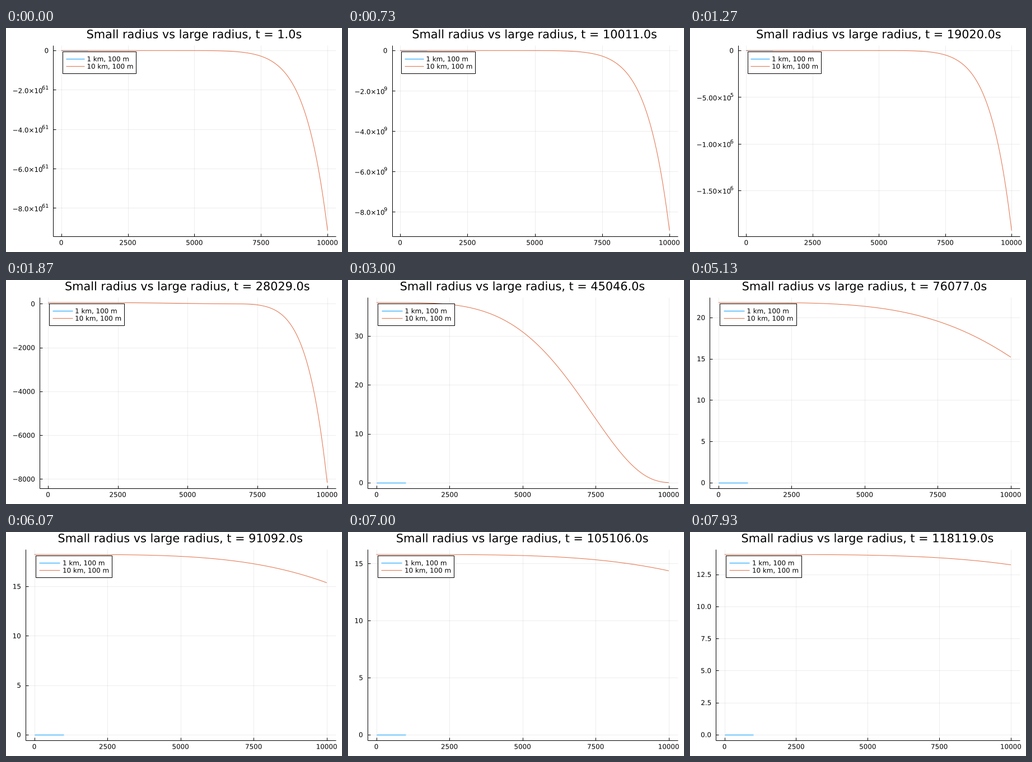
Recreate the animation shown at these times as a matplotlib script. Size 600 by 400 pixels, loop 8000 ms.

```python
import math

import numpy as np
import matplotlib.pyplot as plt
from matplotlib.animation import FuncAnimation
from matplotlib.patches import PathPatch, Rectangle
from matplotlib.path import Path
from matplotlib.textpath import TextPath
from matplotlib.transforms import Affine2D

W, H, DPI = 600, 400, 100
FRAMES, LOOP_MS = 120, 8000
PX = 72 / DPI                       # one pixel in points
TOP, BOTTOM, RIGHT = 30.5, 371.5, 588.5
PAD = 0.03                          # axis padding as a share of the data range
SMALL, SUPER, LARGE = 11.9, 9.5, 20.8
BLUE, ORANGE = "#009AFA", "#E36F47"
NICE = [(1, 1.0), (5, 0.9), (2, 0.7), (2.5, 0.5), (3, 0.2)]

plt.rcParams["font.family"] = "DejaVu Sans"
fig = plt.figure(figsize=(W / DPI, H / DPI), dpi=DPI, facecolor="white")
ax = fig.add_axes([0, 0, 1, 1])


def dome(r, t, radius, t_height, t_radius):
    """Height of a spreading dome that starts 100 m high."""
    return 100 * t_height / t * (1 - (t_radius * r / (t * radius)) ** 4) ** 3


def nice_ticks(lo, hi):
    """Pick 4 to 8 round ticks, scored on count, coverage and niceness."""
    span = hi - lo
    order = math.floor(math.log10(span))
    best, best_score = [], -math.inf
    for z in range(order - 2, order + 1):
        for q, niceness in NICE:
            step = q * 10.0 ** z
            first, last = math.ceil(lo / step), math.floor(hi / step)
            n = last - first + 1
            if not 4 <= n <= 8:
                continue
            count = 1 - abs(n - 5) / 5
            cover = 1.5 * span / ((n - 1) * step)
            score = count / 4 + cover / 3 + niceness / 4
            if score > best_score:
                best_score = score
                best = [i * step for i in range(first, last + 1)]
    return best


def decimals(number):
    return len(number.rstrip("0").split(".")[1])


def tick_labels(ticks):
    """Pairs of (text, exponent); the exponent is empty for plain numbers."""
    if math.log10(ticks[-1] - ticks[0]) > 5:
        parts = [f"{v:.8e}".split("e") for v in ticks]
        d = max(decimals(m) for m, _ in parts) + 1
        pairs = [(f"{float(m):.{d}f}×10", str(int(e))) if float(m) else ("0", "")
                 for m, e in parts]
    else:
        d = max(decimals(f"{v:.8f}") for v in ticks)
        pairs = [(f"{v + 0.0:.{d}f}", "") for v in ticks]
    return [(s.replace("-", "−"), e) for s, e in pairs]


def ink(s, size):
    """Outline of a text with its left edge and inked width."""
    path = TextPath((0, 0), s, size=size)
    xs = path.vertices[path.codes != Path.CLOSEPOLY, 0]
    return path, xs.min(), xs.max() - xs.min()


def write(x, y, s, size, align):
    """Put text on baseline y; align 0, 0.5 or 1 is left, centre or right."""
    path, left, width = ink(s, size)
    move = Affine2D().scale(1, -1).translate(x - left - align * width, y)
    ax.add_patch(PathPatch(path.transformed(move), fc="black", lw=0, zorder=6))
    return width


def line(x, y, color="black", width=1.0, alpha=1.0, z=2):
    ax.plot(x, y, color=color, lw=width * PX, alpha=alpha, zorder=z,
            solid_capstyle="butt")


def label_width(label):
    text, power = label
    return ink(text, SMALL)[2] + (ink(power, SUPER)[2] if power else 0)


def draw_legend(left):
    width = RIGHT - left
    x = left + 0.0328 * width
    y = TOP + (BOTTOM - TOP) / 30
    names = ["1 km, 100 m", "10 km, 100 m"]
    box = 0.1 * width + ink(names[1], SMALL)[2]
    ax.add_patch(Rectangle((x, y), box, 39, fc="white", ec="black",
                           lw=PX, zorder=4))
    for i, (name, color) in enumerate(zip(names, (BLUE, ORANGE))):
        row = y + 13.2 * (i + 1)
        line([x + 0.0115 * width, x + 0.078 * width], [row, row], color, z=5)
        write(x + 0.089 * width, row + 4.4, name, SMALL, 0)


def draw(k):
    t = 1.0 + 1001 * k
    r_small, r_large = np.linspace(0, 1000, 101), np.linspace(0, 10000, 501)
    small = dome(r_small, t, 1000, 1.66, 4.4167)
    large = dome(r_large, t, 10000, 16602, 44167)
    lo, hi = min(small.min(), large.min()), max(small.max(), large.max())
    pad = PAD * (hi - lo)
    ticks = nice_ticks(lo - pad, hi + pad)
    labels = tick_labels(ticks)
    left = 21.85 + max(label_width(label) for label in labels)

    def to_x(r):
        return left + (RIGHT - left) * (r / 10000 + PAD) / (1 + 2 * PAD)

    def to_y(v):
        return BOTTOM - (BOTTOM - TOP) * ((v - lo) / (hi - lo) + PAD) / (1 + 2 * PAD)

    ax.clear()
    ax.set_xlim(0, W)
    ax.set_ylim(H, 0)
    ax.axis("off")

    for r in range(0, 10001, 2500):
        x = to_x(r)
        line([x, x], [TOP, BOTTOM], width=0.7, alpha=0.1, z=1)
        line([x, x], [BOTTOM, BOTTOM - 5])
        write(x, 387.4, str(r), SMALL, 0.5)
    for v, (text, power) in zip(ticks, labels):
        y, x = to_y(v), left - 9
        line([left, RIGHT], [y, y], width=0.7, alpha=0.1, z=1)
        line([left, left + 5], [y, y])
        if power:
            x -= write(x, y - 0.5, power, SUPER, 1)
        write(x, y + (5.8 if power else 4.4), text, SMALL, 1)
    line([left, left], [TOP, BOTTOM + 0.5])
    line([left, RIGHT], [BOTTOM, BOTTOM])

    line(to_x(r_small), to_y(small), BLUE, z=3)
    line(to_x(r_large), to_y(large), ORANGE, z=3)
    draw_legend(left)
    write((left + RIGHT) / 2 - 0.3, 18.3,
          f"Small radius vs large radius, t = {t:.1f}s", LARGE, 0.5)
    return []


anim = FuncAnimation(fig, draw, frames=FRAMES, init_func=lambda: draw(0),
                     interval=LOOP_MS / FRAMES, repeat=True, repeat_delay=0)
plt.show()
```
